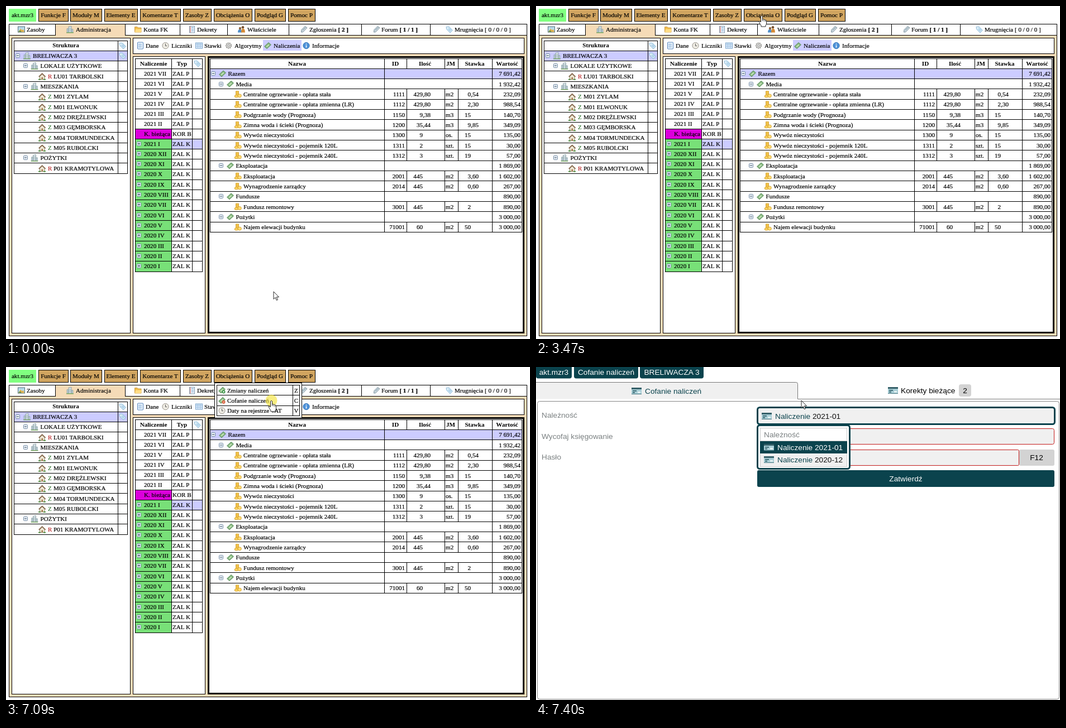
An HTML page that plays this animation: 938 by 597 pixels, repeating every 8000 ms.

```html
<!DOCTYPE html>
<html lang="pl">
<head>
<meta charset="utf-8">
<title>Cofanie naliczeń</title>
<style>
html, body { margin: 0; width: 100%; height: 100%; overflow: hidden; background: #fff; }
svg { display: block; width: 938px; height: 597px; }
.serif { font: 11.1px "Liberation Serif", "Times New Roman", serif; }
.serif text { stroke: #000; stroke-width: .2px; }
.sans { font: 13.7px "Liberation Sans", Arial, sans-serif; }
</style>
</head>
<body>
<svg id="stage" viewBox="0 0 938 597"></svg>
<script>
const LOOP = 8000;
const PEACH = '#f5dbb7', LILAC = '#ccccff', TEAL = '#0b434d', PALE = '#f0f0f0', GREY = '#7b8182';
const OBJECT = 'BRELIWACZA 3', DOC = 'akt.mzr3';

// baselines sit on whole pixels
const text = (x, y, s, anchor = 'start', fill = '#000', extra = '') =>
  `<text x="${x}" y="${Math.round(y)}" text-anchor="${anchor}" fill="${fill}" ${extra}>${s}</text>`;
const bold = (x, y, s) => text(x, y, s, 'middle', '#000', 'font-weight="700" style="stroke:none"');
const fillBox = (x, y, x2, y2, fill, rx = 0) =>
  `<rect x="${x}" y="${y}" width="${x2 - x}" height="${y2 - y}" fill="${fill}" rx="${rx}"/>`;
const box = (x, y, x2, y2, fill, stroke = '#000', w = 1, rx = 0) =>
  `<rect x="${x + w / 2}" y="${y + w / 2}" width="${x2 - x + 1 - w}" height="${y2 - y + 1 - w}"
    fill="${fill}" stroke="${stroke}" stroke-width="${w}" rx="${rx}"/>`;
const hline = (x, x2, y) => fillBox(x, y, x2 + 1, y + 1, '#000');
const vline = (x, y, y2) => fillBox(x, y, x + 1, y2 + 1, '#000');
const path = (d, fill = 'none', stroke = 'none', w = 1) =>
  `<path d="${d}" fill="${fill}" stroke="${stroke}" stroke-width="${w}"/>`;

const bill = path('M.5 8L8 1L12.5 5L5 12Z', '#83b57c', '#4d8253', .8) + path('M3.5 8L8 4L9.5 5.5L5 9.5Z', '#c4e3b9');
const ICONS = {
  building: path('M1 12V5H4V12ZM9 12V6H12V12Z', '#b9ccd2', '#7f979f', .6) +
    path('M4 12V1.5L9 .5V12Z', '#e0eaec', '#70868e', .7) + path('M5.5 3V11M7.5 3V11', 'none', '#93adb5', .8) +
    path('M0 12.3H13', 'none', '#74a45c', 1.4),
  house: path('M2.5 6.5V12H11V6.5L6.7 2.5Z', '#f1ead8', '#75694f', .8) +
    path('M.7 7.2L6.7 1.4L12.7 7.2', 'none', '#87694c', 1.6) + path('M5.5 12V8H8V12Z', '#a37a4c') +
    path('M0 12H4M9 12H13', 'none', '#58924a', 2),
  tag: path('M1 2L6 1.5L12.5 8L8 12.5L1.5 6Z', '#cfe6f4', '#86b6d5', .9) +
    path('M5 6L8.5 9.5M6.5 4.5L10 8', 'none', '#79aed3', .9) + '<circle cx="3.2" cy="3.7" r=".9" fill="#fff"/>',
  pin: path('M2 7L8 1L12 3.5L5 11L1.5 11.5Z', '#cfdae0', '#708896', .9) + path('M4 8L9 3', 'none', '#62879a'),
  bill,
  coins: path('M3 1H8V11H3Z', '#f9cf57', '#c68c18', .7) + path('M3 3.5H8M3 6H8', 'none', '#d79d24', .7) +
    '<ellipse cx="4" cy="10.3" rx="3.5" ry="2.2" fill="#fbd563" stroke="#c68c18" stroke-width=".7"/>' +
    '<ellipse cx="9.7" cy="9.4" rx="3.2" ry="3" fill="#ffdd74" stroke="#c68c18" stroke-width=".7"/>',
  picture: box(0, 1, 12, 11, '#b9dcec', '#55717a') + path('M1 11L5 5L8 8L10 6L12 11Z', '#e0b04d') +
    path('M1 11L4 8L7 11Z', '#568944'),
  folder: path('M.5 11.5V2H5L6.5 3.5H12V11.5Z', '#f0bd4d', '#c48b27', .8) + path('M2 6H13L11.5 11.5H.5Z', '#ffdd86'),
  ledger: box(2, 0, 11, 12, '#eef5fb', '#8199ae') + path('M4 1V12', 'none', '#d65c4f') +
    path('M6 3H10M6 6H10M6 9H10', 'none', '#6e9dc9'),
  people: path('M0 12Q0 6 4 6Q7 6 7 12Z', '#4f8fc9') + path('M6 12Q6 5 9 5Q13 5 13 12Z', '#d78b35') +
    '<circle cx="4" cy="4.5" r="2.2" fill="#8d6239"/><circle cx="9" cy="2.8" r="2.3" fill="#77502e"/>',
  page: box(1, 0, 11, 12, '#edf5fd', '#5483bb', 1, 1) + path('M3 4H9M3 6.5H9M3 9H9', 'none', '#78a6d4'),
  clock: '<circle cx="6.5" cy="6.5" r="5.6" fill="#eeebe3" stroke="#96928a"/>' + path('M6.5 3V7H9', 'none', '#555'),
  sheet: box(0, 1, 12, 11, '#dcebfa', '#7da5cc') + path('M1 4H12M4.5 2V11M8.5 2V11M1 7.5H12', 'none', '#93b9dd', .9),
  gear: '<circle cx="6.5" cy="6.5" r="4.6" fill="#e1e1df" stroke="#8d8d89" stroke-width="2" stroke-dasharray="2 1.2"/>' +
    '<circle cx="6.5" cy="6.5" r="1.7" fill="#fff" stroke="#888"/>',
  info: '<circle cx="6.5" cy="6.5" r="5.7" fill="#4c91d8" stroke="#2f69ad" stroke-width=".8"/>' +
    path('M6.5 5.7V10M6.5 3V4.6', 'none', '#fff', 1.6),
  billAdd: bill + '<circle cx="9.5" cy="9.5" r="3" fill="#399345"/>' + path('M8 9.5H11M9.5 8V11', 'none', '#fff'),
  billDrop: bill + '<circle cx="9.5" cy="9.5" r="3" fill="#d85b35"/>' + path('M8 9.5H11', 'none', '#fff')
};
const icon = (name, x, y) => `<g transform="translate(${x} ${y})">${ICONS[name]}</g>`;
const expander = (x, y, plus) => box(x, y, x + 7, y + 7, '#eef4fa', '#6f87a0', 1, 1) +
  path(`M${x + 2} ${y + 4}h4${plus ? `m-2-2v4` : ''}`, 'none', '#253c55');

const ROW = 18.33;
const edge = (top, r) => Math.round(top + ROW * r);

function topBar() {
  const buttons = [['Funkcje F', 58, 111], ['Moduły M', 115, 171], ['Elementy E', 176, 235], ['Komentarze T', 240, 312],
    ['Zasoby Z', 317, 367], ['Obciążenia O', 372, 440], ['Podgląd G', 445, 500], ['Pomoc P', 505, 553]];
  return fillBox(5, 5, 54, 28, '#80ff80') + text(29.5, 20, DOC, 'middle') +
    buttons.map(([s, a, b]) => box(a, 5, b, 27, '#d1a560') + text((a + b) / 2, 20, s, 'middle')).join('');
}

function tabs() {
  const strong = s => `<tspan font-weight="700">${s}</tspan>`;
  const list = [['Zasoby', 'picture', 5, 21, 37], ['Administracja', 'building', 88, 108, 125], ['Konta FK', 'folder', 213, 230, 246],
    ['Dekrety', 'ledger', 311, 326, 342], ['Właściciele', 'people', 396, 415, 432],
    ['Zgłoszenia ' + strong('[ 2 ]'), 'pin', 506, 527, 543], ['Forum ' + strong('[ 1 / 1 ]'), 'pin', 636, 657, 672],
    ['Mrugnięcia [ 0 / 0 / 0 ]', 'tag', 759, 787, 803]];
  return list.map(([s, ic, x, ix, tx], i) => {
    const end = i < 7 ? list[i + 1][2] : 932;
    return box(x, 32, end, 52, i === 1 ? PEACH : '#fff') + (i === 1 ? fillBox(x + 1, 52, end, 53, PEACH) : '') +
      icon(ic, ix, 35.5) + text(tx, 46, s);
  }).join('');
}

function toolbar() {
  const list = [['Dane', 'page', 234, 250], ['Liczniki', 'clock', 279, 296], ['Stawki', 'sheet', 339, 355],
    ['Algorytmy', 'gear', 392, 409], ['Naliczenia', 'bill', 462, 479], ['Informacje', 'info', 531, 548]];
  return box(227, 57, 927, 85, '#fff') + fillBox(460, 61, 529, 80, LILAC) +
    list.map(([s, ic, x, tx]) => icon(ic, x, 64.5) + text(tx, 75, s)).join('');
}

function tree() {
  const rows = [[0, OBJECT], [1, 'LOKALE UŻYTKOWE'], ['R', 'LU01 TARBOLSKI'], [1, 'MIESZKANIA'], ['Z', 'M01 ZYLAM'],
    ['Z', 'M01 ELWONUK'], ['Z', 'M02 DRĘŻLEWSKI'], ['Z', 'M03 GĘMBORSKA'], ['Z', 'M04 TORMUNDECKA'],
    ['Z', 'M05 RUBOLCKI'], [1, 'POŻYTKI'], ['R', 'P01 KRAMOTYLOWA']];
  let out = box(10, 57, 222, 586, '#fff') + fillBox(14, 80, 218, 98, LILAC) +
    bold(107, 74, 'Struktura') + icon('tag', 202, 64.5) + icon('tag', 202, 82.5);
  rows.forEach(([kind, name], i) => {
    const y = 89 + ROW * i, base = y + 4;
    if (typeof kind === 'string') {
      out += icon('house', 58, y - 6) + text(75, base, kind, 'start', kind === 'R' ? '#b00000' : '#106010', 'style="stroke:none"') +
        text(85, base, name);
    } else {
      const x = 17 + 13.5 * kind;
      out += expander(Math.round(x), Math.round(y) - 4) + icon('building', x + 14, y - 6.5) + text(x + 31, base, name);
    }
  });
  for (let r = 0; r <= 13; r++) out += hline(14, 217, edge(61.5, r));
  return out + [14, 200, 217].map(x => vline(x, 62, 300)).join('');
}

function periods() {
  const names = ['2021 VII', '2021 VI', '2021 V', '2021 IV', '2021 III', '2021 II', 'K. bieżąca', '2021 I'];
  for (const n of ['XII', 'XI', 'X', 'IX', 'VIII', 'VII', 'VI', 'V', 'IV', 'III', 'II', 'I']) names.push('2020 ' + n);
  const top = i => i < 8 ? 112 + 18 * i - (i === 7 ? .5 : 0) : 237.5 + ROW * (i - 7);
  let out = box(227, 90, 356, 586, '#fff') + hline(231, 351, 94) +
    bold(264, 107, 'Naliczenie') + bold(315, 107, 'Typ') + icon('tag', 336, 96.5);
  names.forEach((n, i) => {
    const y = Math.round(top(i)), end = Math.round(top(i + 1)), base = top(i) + 13;
    if (i > 5) out += fillBox(231, y, 296, end, i === 6 ? '#dc00dc' : '#78e078');
    if (i === 7) out += fillBox(296, y, 352, end, LILAC);
    if (i > 6) out += expander(234, y + 5, true);
    out += text(247, base, n) + text(298, base, i < 6 ? 'ZAL P' : i === 6 ? 'KOR B' : 'ZAL K') + hline(231, 351, y);
  });
  return out + hline(231, 351, 476) + [231, 296, 333, 351].map(x => vline(x, 94, 476)).join('');
}

function charges() {
  const rows = ['Razem|7 691,42', 'Media|1 932,42',
    'Centralne ogrzewanie - opłata stała|1111|429,80|m2|0,54|232,09',
    'Centralne ogrzewanie - opłata zmienna (LR)|1112|429,80|m2|2,30|988,54',
    'Podgrzanie wody (Prognoza)|1150|9,38|m3|15|140,70', 'Zimna woda i ścieki (Prognoza)|1200|35,44|m3|9,85|349,09',
    'Wywóz nieczystości|1300|9|os.|15|135,00', 'Wywóz nieczystości - pojemnik 120L|1311|2|szt.|15|30,00',
    'Wywóz nieczystości - pojemnik 240L|1312|3|szt.|19|57,00', 'Eksploatacja|1 869,00',
    'Eksploatacja|2001|445|m2|3,60|1 602,00', 'Wynagrodzenie zarządcy|2014|445|m2|0,60|267,00',
    'Fundusze|890,00', 'Fundusz remontowy|3001|445|m2|2|890,00',
    'Pożytki|3 000,00', 'Najem elewacji budynku|71001|60|m2|50|3 000,00'];
  const heads = [['Nazwa', 521], ['ID', 697], ['Ilość', 750], ['JM', 796], ['Stawka', 839], ['Wartość', 897]];
  const inner = [717, 785, 809], top = 93.5;
  // whole numbers stay left of the decimal comma
  const num = (x, y, s) => text(s.includes(',') ? x : x - 14, y, s, 'end');
  let out = box(361, 90, 927, 586, '#fff', '#000', 3) + fillBox(366, 112, 924, 130, LILAC) +
    heads.map(([s, x]) => bold(x, 107, s)).join('') + inner.map(x => vline(x, 94, 112)).join('');
  rows.forEach((line, i) => {
    const f = line.split('|'), y = edge(top, i + 1), mid = 103 + ROW * (i + 1), base = mid + 4;
    if (f.length > 2) {
      out += icon('coins', 408.5, mid - 6.5) + text(425, base, f[0]) + text(714, base, f[1], 'end') + num(760, base, f[2]) +
        text(787, base, f[3]) + num(846, base, f[4]) + inner.map(x => vline(x, y, edge(top, i + 2))).join('');
    } else {
      const x = i ? 381 : 367;
      out += expander(x, Math.round(mid) - 4) + icon('bill', x + 14, mid - 6.5) + text(x + 30.5, base, f[0]);
    }
    out += text(921, base, f[f.length - 1], 'end');
  });
  for (let r = 0; r <= 17; r++) out += hline(365, 923, edge(top, r));
  return out + [365, 677, 870, 923].map(x => vline(x, 94, 405)).join('');
}

function menu() {
  const rows = [['Zmiany naliczeń', 'Z', 'billAdd'], ['Cofanie naliczeń', 'C', 'billDrop'], ['Daty na rejestrze VAT', 'V', 'clock']];
  return box(373, 28, 529, 91, '#fff') + box(377, 32, 525, 87, '#fff') + vline(513, 32, 87) +
    rows.map(([s, key, ic], i) => {
      const y = 41.5 + ROW * i;
      return icon(ic, 380, y - 6.5) + text(396, y + 4, s) + text(519.5, y + 4, key, 'middle') + (i ? hline(377, 525, edge(32, i)) : '');
    }).join('');
}

const card = (x, y) => fillBox(x, y, x + 18, y + 12, '#a9ced6') + fillBox(x, y, x + 18, y + 3, '#345f68') +
  fillBox(x + 2, y + 5, x + 9, y + 6.5, '#21525c') + fillBox(x + 2, y + 8, x + 6, y + 9.5, '#21525c') +
  fillBox(x + 11, y + 7, x + 16, y + 9.5, '#e9f4f5') + fillBox(x, y + 11, x + 18, y + 12, '#4b7881');
const entry = (x, y, date) => text(x, y, `Naliczenie <tspan fill="#111">${date}</tspan>`, 'start', TEAL);

function form() {
  const chips = [[DOC, 0, 64], ['Cofanie naliczeń', 68, 183], [OBJECT, 186, 300]];
  return fillBox(0, 0, 938, 597, '#fff') +
    chips.map(([s, a, b]) => fillBox(a, -6, b, 20.5, TEAL, 4) + text((a + b) / 2, 14, s, 'middle', '#fff')).join('') +
    path('M-1 57.5V27.5H465.5Q468.5 27.5 468.5 30.5V57.5Z', PALE) +
    path('M0 27.5H465.5Q468.5 27.5 468.5 30.5V57.5H938', 'none', '#777') +
    card(171, 37) + text(195, 48, 'Cofanie naliczeń', 'start', TEAL) +
    card(630, 36) + text(653, 47, 'Korekty bieżące') + fillBox(757, 31, 779, 53, '#d3d3d3', 4) + text(768, 47, '2', 'middle') +
    box(2, 61, 936, 595, '#fff', '#858585', 1, 4) +
    text(10, 91, 'Należność', 'start', GREY) + text(10, 129, 'Wycofaj księgowanie', 'start', GREY) + text(10, 166, 'Hasło', 'start', GREY) +
    box(395, 71, 929, 103, PALE, TEAL, 3, 4) + card(404, 82) + entry(428, 93, '2021-01') +
    box(396, 110, 927, 138, PALE, '#c21a1a', 1, 3) +
    box(396, 148, 864, 176, PALE, '#c21a1a', 1, 2) + fillBox(865, 148, 928, 177, '#d3d3d3', 3) + text(896, 167, 'F12', 'middle') +
    fillBox(396, 185, 928, 215, TEAL, 3) + text(662, 205, 'Zatwierdź', 'middle', '#fff');
}

const options = () => box(395, 103, 562, 183, '#fff', TEAL, 3, 4) + box(401, 109, 556, 178, PALE, '#ccc') +
  box(401, 109, 556, 132, '#fff', '#ccc') + text(408, 126, 'Należność', 'start', GREY) +
  fillBox(401, 133, 557, 155, TEAL) + card(408, 138) + text(432, 149, 'Naliczenie 2021-01', 'start', '#fff') +
  card(408, 160) + entry(432, 171, '2020-12');

const stage = document.getElementById('stage');
const group = (id, body, cls = '') => `<g id="${id}" class="${cls}">${body}</g>`;
stage.innerHTML =
  group('desk', fillBox(0, 0, 938, 597, '#fff') + topBar() + box(5, 52, 932, 591, PEACH) + tabs() + toolbar() +
    tree() + periods() + charges() + group('menu', menu()), 'serif') +
  group('dark', fillBox(0, 0, 938, 597, '#2b2a2e') + fillBox(0, 595, 938, 597, '#242327')) +
  group('form', form() + group('options', options()), 'sans') +
  '<circle id="glow" r="10.5" fill="#f3e23c" opacity=".65"/>' +
  group('cursor',
    group('arrow', path('M0 0V13.5L3.2 10.6L5.3 15.6L7.4 14.7L5.3 9.8H9.5Z', '#fff', '#111', .9)) +
    group('hand', path('M-1.5 1.5Q0-.8 1.5 1.5V7Q3 5.8 4 7.3Q6 6.6 6.5 8.3Q8.5 8 8.5 10V15Q8 17 7 18V20H-1V18Q-4 14-5 11Q-4.5 9-2 11.2L-1.5 11.7Z', '#fff', '#111', .9) +
      path('M1.5 7V10M4 8V10.5M6.5 9V11', 'none', '#111', .8)));

const el = {};
for (const node of stage.querySelectorAll('[id]')) el[node.id] = node;
const show = (name, on) => { el[name].style.display = on ? '' : 'none'; };

// start, end, steps, target x, target y, easing
const smooth = p => p * p * (3 - 2 * p);
const out = e => p => 1 - (1 - p) ** e;
const MOVES = [
  [460, 540, 2, 482, 533, smooth], [620, 1200, 8, 437, 107, smooth], [1270, 1810, 8, 397, 15, out(1.6)],
  [1980, 2060, 2, 389, 15, smooth], [2310, 3010, 10, 428, 17, out(2)], [3240, 3470, 4, 404, 17, out(1.5)],
  [4320, 4790, 7, 396, 59, smooth], [5020, 5780, 11, 448, 59, out(1.55)], [5850, 6080, 4, 460, 59.5, out(1.5)],
  [6310, 6390, 2, 469, 59.5, smooth], [6540, 6770, 4, 475, 60, out(1.5)]
];

function pointer(t) {
  let x = 479, y = 512;
  for (const [start, end, n, tx, ty, ease] of MOVES) {
    if (t < start) break;
    const step = Math.floor((t - start) / (end - start) * (n - 1) + 1e-6) + 1;
    const p = ease(Math.min(1, step / n));
    x += (tx - x) * p;
    y += (ty - y) * p;
  }
  return [Math.round(x), Math.round(y)];
}

function draw(t) {
  const [x, y] = pointer(t);
  const leaving = t >= 7170;
  const hand = !leaving && t > 1270 && y < 61;
  show('desk', !leaving);
  show('menu', t >= 3700);
  show('dark', leaving && t < 7250);
  show('form', t >= 7250);
  show('options', t >= 7400);
  show('glow', (t >= 3620 && t < 3790) || (t >= 7090 && !leaving));
  show('hand', hand);
  show('arrow', !hand);
  el.glow.setAttribute('cx', x);
  el.glow.setAttribute('cy', y);
  el.cursor.setAttribute('transform', `translate(${x} ${y})`);
}

const begin = performance.now();
function tick() {
  draw((performance.now() - begin) % LOOP);
  requestAnimationFrame(tick);
}
tick();
</script>
</body>
</html>
```
